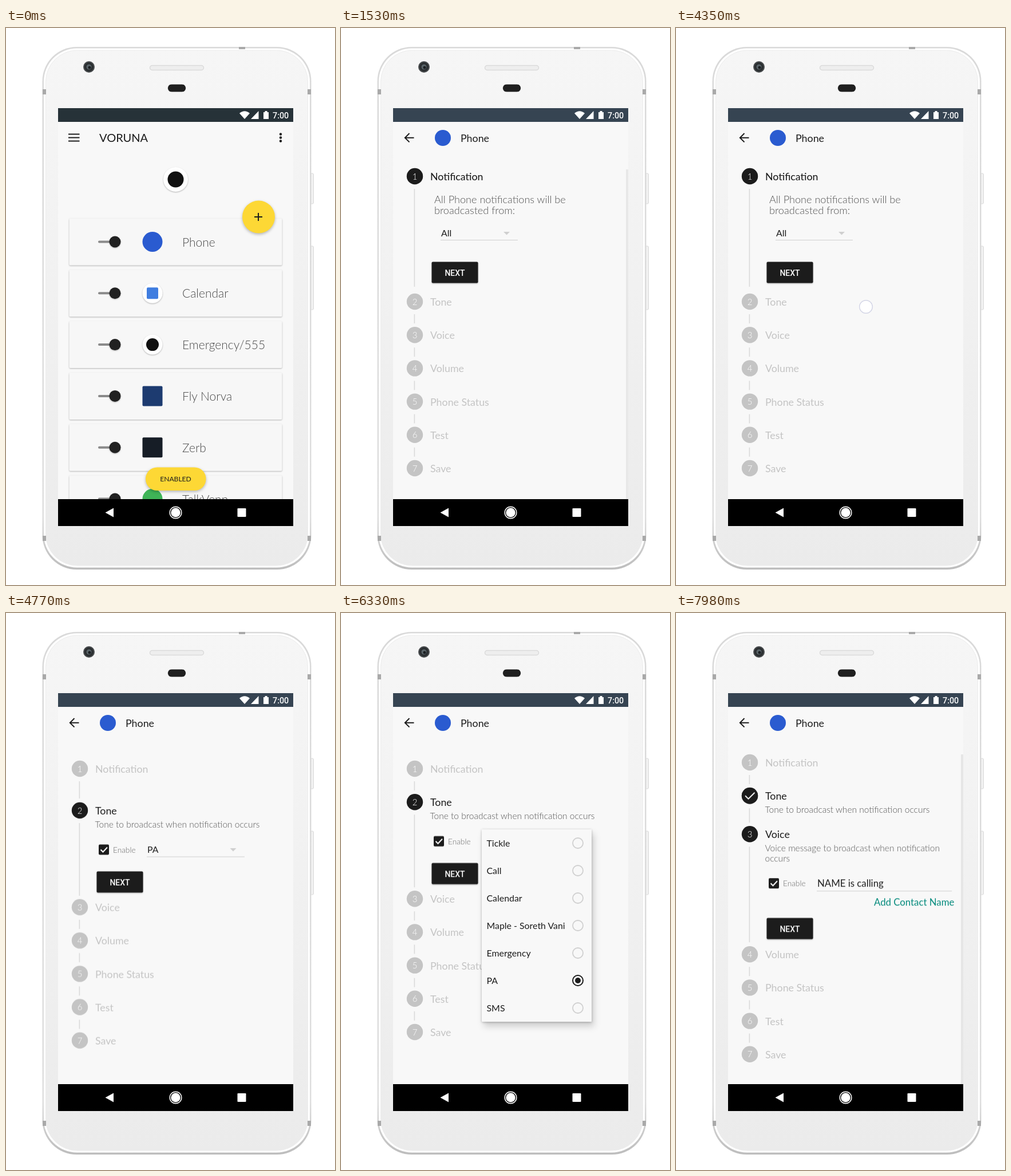
Write an HTML page that moves like this. It is 575x973 px and loops after 8000 ms.

```html
<!DOCTYPE html>
<html lang="en">
<head>
<meta charset="utf-8">
<title>Notification setup</title>
<style>
html, body { margin: 0; width: 100%; height: 100%; overflow: hidden; background: #fff; }
svg { display: block; width: 575px; height: 973px; font-family: Lato, sans-serif; font-weight: 300; }
.r { font-family: Roboto, sans-serif; font-weight: 500; }
.n { font-weight: 400; }
.mid { text-anchor: middle; }
.card { filter: drop-shadow(0 1px 1px rgba(0,0,0,.28)); }
.raised { filter: drop-shadow(0 2px 2.5px rgba(0,0,0,.28)); }
.popup rect { filter: drop-shadow(0 1px 2px rgba(0,0,0,.25)) drop-shadow(4px 8px 6px rgba(0,0,0,.16)); }
.popup { transform-box: fill-box; transform-origin: 0 0; }
</style>
</head>
<body>
<svg id="stage" viewBox="0 0 575 973">
  <defs>
    <linearGradient id="shell" x2="0" y2="1">
      <stop offset="0" stop-color="#f6f6f6"/><stop offset="1" stop-color="#ebebeb"/>
    </linearGradient>
    <linearGradient id="rim" x2="0" y2="1">
      <stop offset="0" stop-color="#d9d9d9"/><stop offset=".9" stop-color="#dedede"/><stop offset="1" stop-color="#bdbdbd"/>
    </linearGradient>
    <clipPath id="screen"><path d="M91 140h411v730H91z"/></clipPath>
    <clipPath id="content"><path d="M91 164h411v659H91z"/></clipPath>
  </defs>
</svg>
<script>
const LOOP = 8000;
const INK = '#1c1c1c', PALE = '#c4c4c4', PAPER = '#f8f8f8', BLUE = '#2a5bd0', YELLOW = '#fdd835';

// ---- drawing helpers
const text = (x, y, size, str, fill = INK, cls = '') =>
  `<text x="${x}" y="${y}" font-size="${size}" fill="${fill}" class="${cls}">${str}</text>`;
const rect = (x, y, w, h, fill, rx = 0, extra = '') =>
  `<rect x="${x}" y="${y}" width="${w}" height="${h}" rx="${rx}" fill="${fill}" ${extra}/>`;
const disc = (x, y, r, fill, extra = '') => `<circle cx="${x}" cy="${y}" r="${r}" fill="${fill}" ${extra}/>`;
const line = (d, stroke, width = 2) => `<path d="${d}" fill="none" stroke="${stroke}" stroke-width="${width}"/>`;
const group = (id, body, extra = '') => `<g id="${id}" ${extra}>${body}</g>`;
const caret = (x, y) => `<path d="M${x} ${y}h11l-5.5 5.5z" fill="#cfcfcf"/>`;

// ---- animation helpers: times in ms, each key is [time, value, easing]
const rules = [], tracks = {};
function track(id, prop, ...keys) {
  const name = `${id}-${prop}`;
  if (keys[0][0] > 0) keys.unshift([0, keys[0][1]]);
  if (keys.at(-1)[0] < LOOP) keys.push([LOOP, keys.at(-1)[1]]);
  const frames = keys.map(([t, value, ease = 'linear']) =>
    `${t / LOOP * 100}%{${prop}:${value};animation-timing-function:${ease}}`);
  rules.push(`@keyframes ${name}{${frames.join('')}}`);
  (tracks[id] ??= []).push(`${name} ${LOOP}ms linear infinite`);
}
function show(id, from, to, fade = 1) {
  const keys = from > 0 ? [[from, 0], [from + fade, 1]] : [[0, 1]];
  if (to < LOOP) keys.push([to, 1], [to + fade, 0]);
  track(id, 'opacity', ...keys);
}
const SMOOTH = 'cubic-bezier(.37,0,.63,1)';
const shift = y => `translateY(${y}px)`;

// ---- phone body
function phone() {
  const notch = (x, y, w, h) => rect(x, y, w, h, '#a9a9a9');
  const key = (y, h) => rect(531, y, 6.5, h, '#f2f2f2', 2, 'stroke="#d8d8d8"');
  return key(254, 53) + key(381, 111) +
    rect(63.5, 33, 470, 913, 'url(#rim)', 60) +
    rect(66, 35.5, 465, 907, '#fff', 58) +
    rect(69.5, 39, 458, 900, 'url(#shell)', 55, 'stroke="#ececec"') +
    notch(407, 33, 11, 4) + notch(64, 107, 6, 9) + notch(527, 107, 6, 9) +
    notch(64, 887, 6, 9) + notch(527, 887, 6, 9) +
    disc(145, 68, 10, '#4a4d4f') + disc(145, 68, 8, '#2b2f31') + disc(145, 68, 4.5, '#596368') + disc(146, 69, 2.5, '#1b1f22') +
    rect(251.5, 65.5, 94, 8, '#eee', 4, 'stroke="#dadada" stroke-width="1.5"') +
    rect(282.5, 98, 32, 14, '#1f1f1f', 6.5, 'stroke="#fff"');
}

// ---- list screen
function row(i, name, icon) {
  const y = 373.5 + 89.8 * i;
  return rect(110.5, y - 41, 372, 82, '#f7f7f7', 2, 'class="card"') +
    (i ? '' : rect(110.5, y - 41, 372, 82, '#000', 2, 'id="ripple"')) +
    rect(161, y - 2, 30, 4, '#8a8a8a', 2) + disc(190.5, y, 10, '#212121', 'class="card"') +
    icon(256, y) + text(308, y + 8, 21, name, '#4c4c4c');
}
const square = (size, fill) => (x, y) => rect(x - size / 2, y - size / 2, size, size, fill, 2);
const round = fill => (x, y) => disc(x, y, 17.5, fill);
const badge = mark => (x, y) => disc(x, y, 17.5, '#fff', 'class="card"') + mark(x, y);

function listScreen() {
  const rows = [
    ['Phone', round(BLUE)],
    ['Calendar', badge(square(20, '#3f7de0'))],
    ['Emergency/555', badge((x, y) => disc(x, y, 11, '#111'))],
    ['Fly Norva', square(35, '#1d3b70')],
    ['Zerb', square(35, '#161d26')],
    ['TalkVenn', round('#3fb457')],
  ];
  return rect(91, 140, 411, 683, PAPER) + rect(91, 140, 411, 24, '#263238') +
    line('M109 185.5h19.5M109 191.5h19.5M109 197.5h19.5', INK) +
    text(163, 199, 20, 'VORUNA', INK, 'n') +
    [185.5, 191.5, 197.5].map(y => disc(480, y, 2.2, INK)).join('') +
    disc(296.5, 264.5, 21.5, '#fff', 'class="card"') + disc(296.5, 264.5, 14, '#111') +
    rows.map(([name, icon], i) => row(i, name, icon)).join('') +
    disc(441.5, 330, 28.5, YELLOW, 'class="raised"') + line('M434 330h14M441 323v14', INK) +
    rect(244, 767.5, 105.5, 40.5, YELLOW, 20, 'class="raised"') + text(296.5, 792, 12.1, 'ENABLED', INK, 'n mid');
}

// ---- stepper screen
const nextButton = y => rect(158.5, y - .5, 81, 37, INK, 2, 'class="card"') + text(199, y + 23.5, 14, 'NEXT', '#fff', 'r mid');
const enableBox = y => rect(162, y - 9, 18, 18, INK, 2) + line(`M165.5 ${y}l4 4 7.5 -8`, '#fff') +
  text(187, y + 5, 13.7, 'Enable', '#666');
const hint = (y, str) => text(155.5, y, 15.5, str, '#555');

const bodies = {
  1: group('body1',
    text(163, 46.5, 18.1, 'All Phone notifications will be', '#505050') +
    text(163, 66, 18.1, 'broadcasted from:', '#505050') +
    text(175, 105, 15.8, 'All', INK, 'n') + caret(284, 97) + rect(174, 111, 135, 1, '#d0d0d0') + nextButton(150)),
  2: group('hint2', hint(30, 'Tone to broadcast when notification occurs')) +
    group('body2', enableBox(68.5) + text(247, 74, 15.8, 'PA', INK, 'n') + caret(391.5, 66) +
      rect(246, 80.5, 171, 1, '#d0d0d0') + nextButton(107)),
  3: group('body3', hint(30, 'Voice message to broadcast when notification') + hint(47.5, 'occurs') +
    enableBox(86) + text(247, 92, 16.8, 'NAME is calling', INK, 'n') + rect(246, 99, 236, 1, '#d0d0d0') +
    text(346, 125, 16.8, 'Add Contact Name', '#00897b', 'n') + nextButton(147)),
};
const stepNames = ['Notification', 'Tone', 'Voice', 'Volume', 'Phone Status', 'Test', 'Save'];

// Each step holds all the later ones, so growing or shrinking one pushes the rest.
function step(i) {
  if (i > 7) return '';
  const face = (fill, ink) => disc(129, 0, 14.2, fill) + text(129, 5.5, 15, i, '#fff', 'mid') +
    text(156, 7, 17.8, stepNames[i - 1], ink, 'n');
  const off = group('off' + i, face(PALE, PALE));
  const active = bodies[i] ? group('on' + i, face(INK, INK)) : '';
  const check = i === 2 ? group('check', disc(129, 0, 14.2, INK) + line('M121 0l5.5 5.5 11 -11', '#fff', 1.8)) : '';
  const link = i < 7 ? `<rect id="link${i}" x="127.6" width="1.6" height="1" fill="#d9d9d9" transform="translate(0 22) scale(1 16)"/>` : '';
  return group('step' + i, off + active + check + link + (bodies[i] || '') + step(i + 1),
    'transform="translate(0 58.2)"');
}

// Rows of a popup are 48 apart, the first one centred at firstY.
function popup(id, x, y, w, h, firstY, names, chosen) {
  const items = names.map((name, i) => {
    const cy = firstY + 48 * i, rx = x + w - 24;
    const on = i === chosen;
    return text(x + 8.5, cy + 5.5, 15.9, name, INK, 'n') +
      disc(rx, cy, 9, 'none', `stroke="${on ? INK : '#d0d0d0'}" stroke-width="${on ? 2 : 1.8}"`) +
      (on ? disc(rx, cy, 5, INK) : '');
  });
  return group(id, rect(x, y, w, h, PAPER, 1) + items.join(''), 'class="popup"');
}

function detailScreen() {
  return rect(91, 140, 411, 683, PAPER) + rect(91, 140, 411, 24, '#364452') +
    line('M127.5 191.7h-15M119.5 184l-7.7 7.7 7.7 7.7', INK) +
    disc(178, 192, 14, BLUE) + text(209, 199, 17.8, 'Phone', INK, 'n') +
    `<g clip-path="url(#content)">${step(1)}</g>` +
    group('scrollbar', rect(498, 247, 4, 576, '#e6e6e6')) +
    popup('from', 174, 338, 149.5, 139, 359.5, ['All', 'Favorites Only', 'Contacts Only'], 0) +
    popup('tones', 246, 378, 192, 336, 402,
      ['Tickle', 'Call', 'Calendar', 'Maple - Soreth Vani', 'Emergency', 'PA', 'SMS'], 5);
}

function systemIcons() {
  return '<path fill="#fff" d="M408 149q9 -7.5 18 0l-9 10zM428 159h13.5v-14zM450 147h2.5v-2h4v2h2.5v12h-9z"/>' +
    text(466, 157.5, 14.3, '7:00', '#fff', 'r') +
    '<path fill="#fff" d="M173.5 846.5l14.5 -8v16z"/>' +
    disc(296.5, 846.5, 8.2, '#fff') + disc(296.5, 846.5, 10.3, 'none', 'stroke="#fff" stroke-width="1.5"') +
    rect(404.5, 839, 15, 15, '#fff', 1);
}

// ---- touches: x, y, from, to
const touches = [
  [380, 374, 720, 860], [240, 360, 2060, 2180], [332, 487, 4180, 4380], [199, 427, 4410, 4520],
  [330, 398, 5840, 5960], [460, 640, 6680, 6840], [199, 455, 7080, 7200],
];
const dots = touches.map(([x, y], i) => disc(x, y, 11.3, '#fff', `id="touch${i}" stroke="#d3d5e6" stroke-width="1.4"`)).join('');

stage.insertAdjacentHTML('beforeend', phone() +
  `<g clip-path="url(#screen)">${listScreen()}${rect(91, 823, 411, 47, '#000')}${group('detail', detailScreen())}</g>` +
  systemIcons() + dots);

// ---- timeline
const ENTER = 880, TONE = 4530, VOICE = 7250;

track('ripple', 'opacity', [740, 0], [860, .08]);
track('detail', 'opacity', [ENTER, 0, 'cubic-bezier(.165,.84,.44,1)'], [ENTER + 200, 1]);
track('detail', 'transform', [ENTER, shift(58), 'cubic-bezier(.23,1,.32,1)'], [ENTER + 350, shift(0)]);
track('scrollbar', 'opacity', [1500, 1], [1750, 0], [VOICE, 0], [VOICE + 60, 1]);

function popupTrack(id, open, close) {
  show(id, open, close, 150);
  track(id, 'transform', [open, 'scale(.85)', 'ease-out'], [open + 180, 'scale(1)']);
}
popupTrack('from', 2160, 4190);
popupTrack('tones', 5940, 6720);

// Three layouts: notification open, tone open, voice open.
function layout(id, format, [a, b, c], first = 300, second = first) {
  track(id, 'transform', [TONE, format(a), SMOOTH], [TONE + first, format(b)],
    [VOICE, format(b), SMOOTH], [VOICE + second, format(c)]);
}
const stretch = h => `translateY(22px) scaleY(${h})`;
layout('step1', shift, [259, 272, 261], 170, 300);
layout('step2', shift, [219, 58.2, 58.2]);
layout('step3', shift, [58.2, 169, 67], 170, 300);
layout('step4', shift, [58.2, 58.2, 210], 300, 170);
layout('link1', stretch, [171, 16, 16]);
layout('link2', stretch, [16, 127, 25], 170, 300);
layout('link3', stretch, [16, 16, 167], 300, 170);

show('on1', 0, TONE, 80);
show('body1', 0, TONE, 80);
show('off2', 0, TONE, 100);
show('on2', TONE, LOOP, 100);
show('hint2', TONE + 50, LOOP, 140);
show('body2', TONE + 50, VOICE, 140);
show('check', VOICE, LOOP, 80);
show('off3', 0, VOICE, 100);
show('on3', VOICE, LOOP, 100);
show('body3', VOICE + 50, LOOP, 140);
touches.forEach(([, , from, to], i) => show('touch' + i, from, to, 30));

for (const id in tracks) rules.push(`#${id}{animation:${tracks[id].join(',')}}`);
document.head.appendChild(document.createElement('style')).textContent = rules.join('\n');
</script>
</body>
</html>
```
